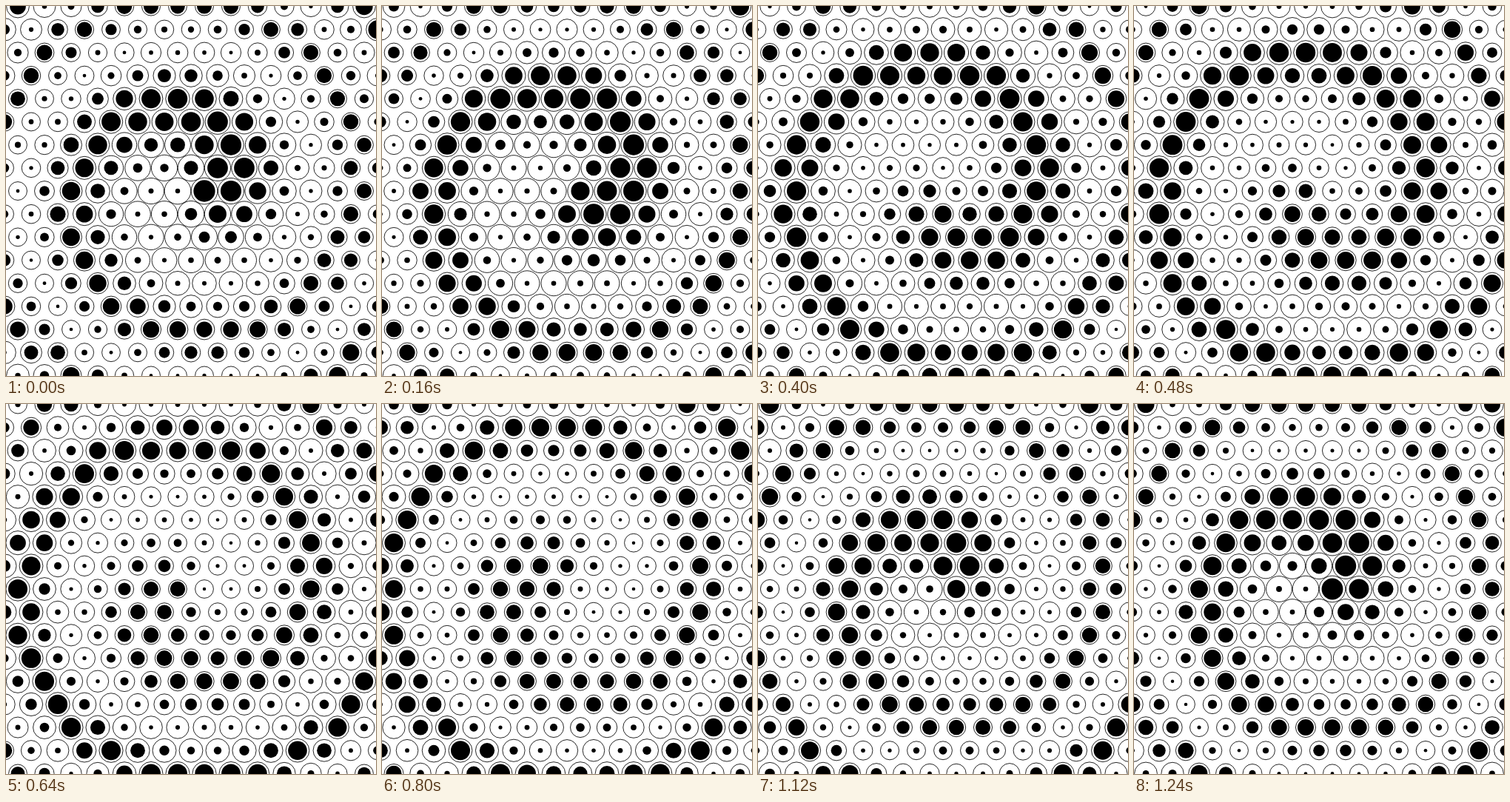
Recreate the animation shown at these times as an HTML page with a canvas. Size 500x500 px, loop 1280 ms.

```html
<!DOCTYPE html>
<html lang="en">
<head>
<meta charset="utf-8">
<title>Spiral dots</title>
<style>
  html, body { margin: 0; width: 100%; height: 100%; overflow: hidden; background: #fff; }
  canvas { display: block; width: 500px; height: 500px; }
</style>
</head>
<body>
<canvas id="stage" width="500" height="500"></canvas>
<script>
const ctx = document.getElementById('stage').getContext('2d');
const TAU = Math.PI * 2;
const LOOP = 1280, STEP = 40;
const SPACING = 36, ROW = SPACING * Math.sqrt(3) / 2;
const MIN_RING = 12.4, MAX_RING = 18;
const wave = turns => Math.cos(TAU * turns);

// Hexagonal lattice centred on the stage, with the phases of each cell
const cells = [];
for (let row = -9; row <= 9; row++) {
  for (let col = -8; col <= 8; col++) {
    const x = col * SPACING + (row % 2 ? 0 : SPACING / 2);
    const y = row * ROW;
    const dist = Math.hypot(x, y);
    const reach = (dist / 229) ** 2;
    cells.push({
      x, y,
      swell: MAX_RING - dist / 130 - MIN_RING, // pulses weaken outwards
      pulse: reach * 0.44,
      spiral: reach + Math.atan2(y, x) / TAU
    });
  }
}

function circle(x, y, r) {
  ctx.beginPath();
  ctx.arc(x, y, r, 0, TAU);
}

function draw(t) {
  ctx.setTransform(1, 0, 0, 1, 0, 0);
  ctx.fillStyle = '#fff';
  ctx.fillRect(0, 0, 500, 500);
  ctx.translate(250, 250);
  ctx.fillStyle = ctx.strokeStyle = '#000';
  ctx.lineWidth = 0.85;
  for (const { x, y, swell, pulse, spiral } of cells) {
    const ring = MIN_RING + swell * (1 + wave(pulse - t)) / 2;
    circle(x, y, ring);
    ctx.stroke();
    circle(x, y, ring * (0.5 + 0.32 * wave(spiral - t)));
    ctx.fill();
  }
}

const start = performance.now();
function tick() {
  const elapsed = (performance.now() - start) % LOOP;
  draw(Math.floor(elapsed / STEP) * STEP / LOOP);
  requestAnimationFrame(tick);
}
tick();
</script>
</body>
</html>
```
